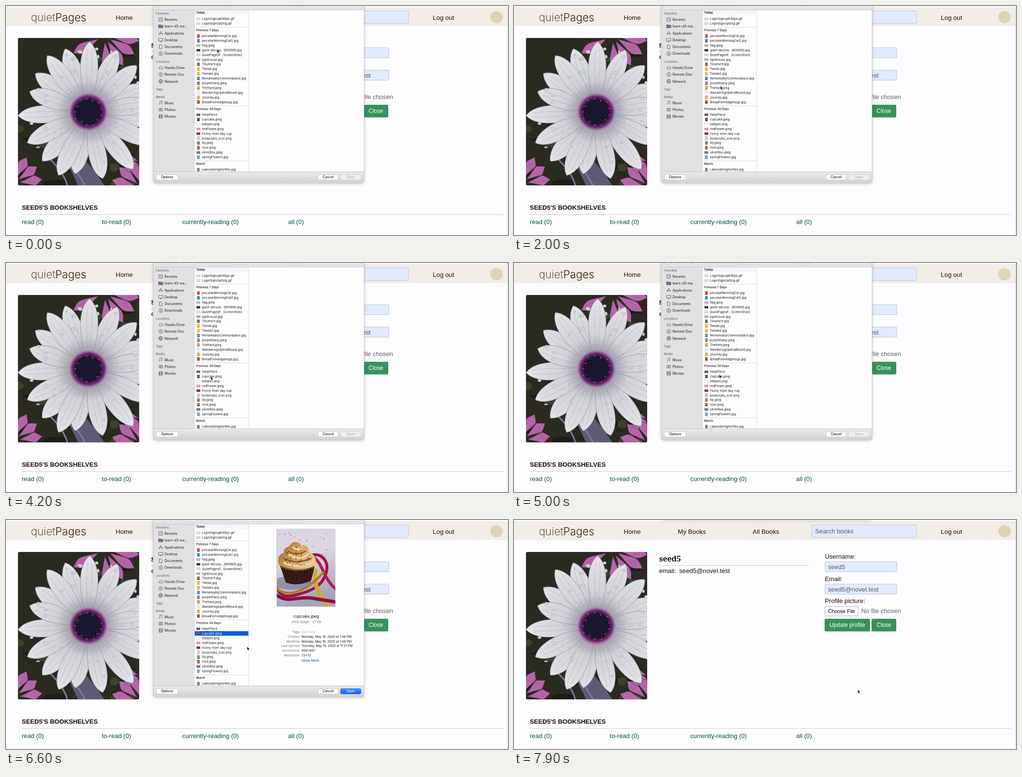
Animation of 1048 by 480 pixels, one loop 8 s. Source, as an HTML page:

```html
<!DOCTYPE html>
<html lang="en">
<head>
<meta charset="utf-8">
<title>Profile picture upload</title>
<style>
html, body { margin: 0; width: 100%; height: 100%; overflow: hidden; background: #fdfcfe; }
svg { display: block; width: 1048px; height: 480px; }
text { font-family: "Liberation Sans", Arial, sans-serif; white-space: pre; }
.ui text { font-family: Inter, Roboto, sans-serif; }
</style>
</head>
<body>
<svg id="stage" viewBox="0 0 1048 480"></svg>
<script>
const text = (x, y, s, size, fill = '#1c0d07', more = '') =>
  `<text x="${x}" y="${y}" font-size="${size}" fill="${fill}" ${more}>${s}</text>`;
const rect = (x, y, w, h, fill, more = '') =>
  `<rect x="${x}" y="${y}" width="${w}" height="${h}" fill="${fill}" ${more}/>`;
const path = (d, fill, more = '') => `<path d="${d}" fill="${fill}" ${more}/>`;
const ellipse = (x, y, rx, ry, fill, more = '') =>
  `<ellipse cx="${x}" cy="${y}" rx="${rx}" ry="${ry}" fill="${fill}" ${more}/>`;
const repeat = (n, f) => Array.from({ length: n }, (_, i) => f(i)).join('');
const middle = 'text-anchor="middle"', bold = 'font-weight="600"', medium = 'font-weight="500"';
const ink = '#161518', gray = '#6d6b70';

let seed = 7;
const random = () => (seed = seed * 16807 % 2147483647) / 2147483647;

const defs = `<defs>
  <radialGradient id="petal" gradientUnits="userSpaceOnUse" cx="0" cy="0" r="150">
    <stop offset=".2" stop-color="#8a3f8c"/><stop offset=".27" stop-color="#a9a3b2"/>
    <stop offset=".45" stop-color="#cfd1d6"/><stop offset="1" stop-color="#e4e5e9"/>
  </radialGradient>
  <radialGradient id="heart">
    <stop offset=".65" stop-color="#2c1436"/><stop offset=".85" stop-color="#6f2470"/>
    <stop offset="1" stop-color="#8b4a90" stop-opacity="0"/>
  </radialGradient>
  <linearGradient id="bar" x2="0" y2="1"><stop stop-color="#e9e8ea"/><stop offset="1" stop-color="#d2d1d3"/></linearGradient>
  <linearGradient id="blue" x2="0" y2="1"><stop stop-color="#3f93fa"/><stop offset="1" stop-color="#0a60ea"/></linearGradient>
  <linearGradient id="table" x2=".25" y2="1">
    <stop stop-color="#dcd5e3"/><stop offset=".45" stop-color="#d9d6e2"/><stop offset="1" stop-color="#a3a5b8"/>
  </linearGradient>
  <linearGradient id="cream" x2="1" y2=".5">
    <stop stop-color="#8a5a26"/><stop offset=".4" stop-color="#c4934a"/><stop offset="1" stop-color="#e3c78c"/>
  </linearGradient>
  <clipPath id="photo"><rect x="25" y="67" width="253" height="309" rx="3"/></clipPath>
  <clipPath id="shot"><rect x="565" y="18.5" width="122.5" height="163"/></clipPath>
  <clipPath id="list"><rect x="394" y="9" width="112" height="338"/></clipPath>
  <filter id="shadow" x="-10%" y="-10%" width="120%" height="120%"><feGaussianBlur stdDeviation="4"/></filter>
</defs>`;

function petal(angle, length, fill = 'url(#petal)', edge = '#8f919e', width = 1) {
  const l = length;
  return `<g transform="rotate(${angle}) scale(1 ${width})">` +
    path(`M15 0C55-21 ${l - 22}-28 ${l} 0C${l - 22} 28 55 21 15 0Z`, fill, `stroke="${edge}" stroke-width=".8"`) +
    path(`M45-3Q${l * .7}-8 ${l - 14}-3M45 3Q${l * .7} 8 ${l - 14} 4`, 'none', `stroke="${edge}" stroke-width=".8" opacity=".45"`) + '</g>';
}

function daisy() {
  const petals = [[-65, 143], [-24, 134], [8, 138], [52, 152], [102, 133], [133, 141], [177, 147], [216, 137], [250, 141],
    [-89, 147], [-44, 140], [-8, 132], [27, 146], [78, 143], [115, 147], [153, 143], [199, 130], [234, 146]];
  const pink = (x, y, angles, l) => `<g transform="translate(${x} ${y})">` +
    angles.map(a => petal(a, l, '#b565a6', '#6f3c6c', .55)).join('') + '</g>';
  return `<g clip-path="url(#photo)">` + rect(25, 67, 253, 309, '#2a2a21') +
    repeat(40, () => ellipse(25 + random() * 253, 67 + random() * 309, 8 + random() * 18, 3 + random() * 7,
      random() < .5 ? '#3c422c' : '#1c1d19')) +
    pink(205, 62, [8, 32, 58, 84, 150], 74) + pink(14, 372, [-62, -35, -8], 62) +
    pink(285, 382, [-165, -138, -112], 66) + pink(290, 330, [165, 200], 46) +
    path('M88 285Q125 315 150 376H205Q170 318 105 270Z', '#5d5a74') +
    path('M95 290Q140 330 165 376M80 310Q120 345 128 376', 'none', 'stroke="#827aa3" stroke-width="3"') +
    `<g transform="translate(172 222)">` + petals.map(p => petal(...p)).join('') +
    repeat(60, () => {
      const a = random() * 6.283, d = 58 + random() * 78;
      return ellipse(Math.cos(a) * d, Math.sin(a) * d, 1.2 + random() * 3.2, 1.2 + random() * 2.8,
        '#d3d5da', 'stroke="#9fa2ac" stroke-width=".7"');
    }) +
    ellipse(0, 0, 39, 38, 'url(#heart)') + ellipse(0, 0, 28, 27, '#17142c') +
    repeat(90, i => {
      const d = 2.9 * Math.sqrt(i), a = i * 2.4;
      return ellipse(Math.cos(a) * d, Math.sin(a) * d, 1.1, 1.1, '#292b4c');
    }) +
    repeat(26, i => {
      const a = i * .2417, d = 25 + i % 3 * 2.5;
      return ellipse(Math.cos(a) * d, Math.sin(a) * d, 1.4, 1.4, i % 2 ? '#a8603a' : '#2c142c');
    }) + '</g></g>';
}

function cupcake() {
  const line = (d, color, w) => path(d, 'none', `stroke="${color}" stroke-width="${w}" stroke-linecap="round"`);
  return `<g id="preview" clip-path="url(#shot)">` + rect(565, 18.5, 122.5, 163, 'url(#table)') +
    ellipse(596, 132, 42, 14, '#77768c', 'opacity=".6"') +
    repeat(26, () => ellipse(567 + random() * 118, 20 + random() * 62, 1.1, 1, random() < .5 ? '#c9347c' : '#a98ad0')) +
    line('M638 74C658 68 676 86 668 112S640 148 606 157 572 150 560 138', '#a30f48', 6) +
    line('M645 80C662 94 664 126 690 146', '#b01c50', 6) +
    line('M646 106C640 128 652 160 676 186', '#d3a637', 9) +
    line('M562 142C590 166 630 148 662 110', '#b07c22', 5) +
    line('M566 158C590 176 610 158 640 164T690 172', '#8e0d3f', 7) +
    path('M571 92L584 131Q610 140 637 127L645 93Z', '#2b1413') +
    repeat(11, i => line(`M${576 + i * 6.4} 99L${587 + i * 4.6} 132`, '#5c3228', 1)) +
    path('M570 94C565 78 572 71 580 69C579 60 586 56 592 56C594 44 611 43 616 53C629 53 634 60 632 67C643 70 650 82 646 95C632 110 584 110 570 94Z', 'url(#cream)') +
    line('M582 90Q612 104 641 88M592 74Q612 86 631 72M600 58Q609 66 618 57', '#ecd3a0', 5) +
    line('M573 97Q608 112 643 98M579 80Q606 95 637 80M590 66Q606 76 626 65', '#80521f', 2.5) +
    repeat(34, () => ellipse(582 + random() * 54, 56 + random() * 40, 1.2, 1.1, random() < .6 ? '#a51c3d' : '#6c2036')) +
    rect(565.25, 18.75, 122, 162.5, 'none', 'stroke="#8f8d96" stroke-width=".5"') + '</g>';
}

function page() {
  const nav = [[229, 'Home'], [342, 'My Books'], [498, 'All Books'], [891, 'Log out']];
  const shelves = [[33, 'read (0)'], [200, 'to-read (0)'], [368, 'currently-reading (0)'], [589, 'all (0)']];
  const field = (x, y, w, h, s) => rect(x + .3, y + .3, w - .8, h - .8, '#e2ebfd', 'rx="2" stroke="#c0c6d0"') +
    text(x + 6.5, y + h / 2 + 4.6, s, 13.2, '#565960');
  const green = (x, w, s) => rect(x, 207, w, 26.5, '#37915d', 'rx="2.5"') + text(x + w / 2, 224.2, s, 11.9, '#fff', middle);
  const rule = (x, y, w) => rect(x, y, w, 1, '#c9c7c9');
  return rect(0, 0, 1048, 480, '#fdfcfe') + rect(0, 3, 1048, 1, '#e6e3e3') + rect(0, 4, 1048, 38, '#f2ede6') +
    `<g class="ui">` + text(52, 32, '<tspan font-weight="200">quiet</tspan><tspan font-weight="300">Pages</tspan>', 22.6, '#382110') + '</g>' +
    nav.map(([x, s]) => text(x, 28.5, s, 13.4)).join('') +
    field(622, 10, 219, 27, 'Search books') + ellipse(1024, 23.5, 13, 13, '#dfd3b8') +
    daisy() +
    text(303, 87, 'seed5', 16, '#1c0d07', 'font-weight="700" style="font-family:\'Noto Serif\',serif"') + rule(303, 95, 313) +
    text(303, 111, 'email:', 13.2) + text(345, 111, 'seed5@novel.test', 13.2) +
    text(649, 81, 'Username:', 13.2) + field(649, 87, 151, 22, 'seed5') +
    text(649, 128, 'Email:', 13.2) + field(649, 134, 151, 22, 'seed5@novel.test') +
    text(649, 174.3, 'Profile picture:', 13.2) +
    rect(649, 181, 69, 20, '#fefefe', 'rx="2" stroke="#b0b0b0"') + text(684, 195, 'Choose File', 10.6, '#000', middle) +
    text(725, 195, 'No file chosen', 13.1, '#5e5e5e') +
    green(648.5, 94.5, 'Update profile') + green(746.5, 51.5, 'Close') +
    text(33, 427, 'SEED5\'S BOOKSHELVES', 13.15, '#1c0d07', 'font-weight="700"') + rule(33, 436.5, 1005) +
    shelves.map(([x, s]) => text(x, 457, s, 13.1, '#00503f')).join('') + rect(1047, 0, 1, 480, '#d6d4d6');
}

function sidebar() {
  const heads = [[16, 'Favorites'], [117, 'Locations'], [175, 'Tags'], [190.5, 'Media']];
  const folder = 'M0 1.5h4l1 1h5v6H0z', ring = 'M.5 5a4.5 4.5 0 1 0 9 0a4.5 4.5 0 1 0-9 0';
  const lens = 'M3.5 5a1.5 1.5 0 1 0 3 0a1.5 1.5 0 1 0-3 0';
  const items = [[28.3, 'Recents', 'M1 1h8v8H1zM5 3v2.5h2'], [42.6, 'learn-d3-ma...', folder],
    [57, 'Applications', 'M1 9L5 1L9 9M0 6h10'], [71.2, 'Desktop', 'M0 1.5h10v6H0zM3 9h4'],
    [85.5, 'Documents', 'M2 .5h4l2 2v7H2z'], [99.7, 'Downloads', ring + 'M5 2v5M3 5l2 2l2-2'],
    [129.2, 'Hazelo Drive', 'M2.5 8a2 2 0 0 1 0-4a3 3 0 0 1 5.5 0a2 2 0 0 1 0 4z'], [143.6, 'Remote Disc', ring + lens],
    [158, 'Network', ring + 'M.5 5h9M5 .5q-4 4.5 0 9q4-4.5 0-9'], [203, 'Music', 'M3 8V1.5l5-1V7M1 8h2M6 7h2'],
    [217.2, 'Photos', 'M1 2h8v6H1z' + lens], [231.5, 'Movies', 'M1 1h8v8H1zM3 1v8M7 1v8M1 5h8']];
  return heads.map(([y, s]) => text(313, y + 2.3, s, 6.2, gray, medium)).join('') +
    items.map(([y, s, d]) => `<g transform="translate(318.5 ${y - 4.5}) scale(.9)">` +
      path(d, d === folder ? '#77757a' : 'none', 'stroke="#59575c"') + '</g>' +
      text(331, y + 2.5, s, 7, ink)).join('');
}

// Each entry: name, thumbnail colour, and 1 for a wide thumbnail.
const groups = [
  ['Today', 14, 27, [['LoginSignup640px.gif', '#d5d5da', 1], ['LoginSignUpOrig.gif', '#d5d5da', 1]]],
  ['Previous 7 Days', 51, 63, [['peculiarMorningCat.jpg', '#cf2929'], ['peculiarMorningCat2.jpg', '#2c6fc4'],
    ['flag.jpeg', '#b9a9ad', 1], ['giant-decora...3810900.jpg', '#17171b', 1], ['QuietPagesF...ScreenShot2', '#d9d9d6', 1],
    ['lighthouse.jpg', '#86a9cc', 1], ['Toluma\'e.jpg', '#6c5148'], ['Tweak.jpg', '#e6b422'], ['Tweak2.jpg', '#e6b422'],
    ['RemarkablyCommonplace.jpg', '#4379ad'], ['purpleDaisy.jpeg', '#77717f'], ['TheYard.jpeg', '#d0913b'],
    ['WanderingUpAndRound.jpg', '#ececec'], ['Journey.jpg', '#c3ad43'], ['BreadForHedgehogs.jpg', '#8d3a2b']]],
  ['Previous 30 Days', 216, 228, [['HarpPiece', '#4b4a5c', 1], ['cupcake.jpeg', '#6b2a31'], ['editpen.png', '#f6f6f6', 1],
    ['redFlower.jpeg', '#e07fae', 1], ['Funny mom day cup', '#4d1c22', 1], ['bookclubs_icon.png', '#d3bfa0'],
    ['lily.jpeg', '#5b7a5c'], ['rose.jpeg', '#9c4848'], ['silverBox.jpeg', '#5e6176', 1], ['springFlowers.jpg', '#6d8fb0']]],
  ['March', 331, 343, [['LakesideHigherRes.jpg', '#68756e']]]
];

function files() {
  const row = ([name, color, wide], y) => {
    const w = wide ? 7.5 : 5.2, h = wide ? 4.8 : 7;
    return rect(401.6 - w / 2, y - h / 2, w, h, color, 'stroke="#b4b2b6" stroke-width=".4"') +
      rect(401.6 - w / 4, y - h / 5, w / 2, h / 4, '#fff', 'opacity=".45"') +
      text(409, y + 2.2, name, 6.5, ink, name === 'cupcake.jpeg' ? 'id="chosen"' : '');
  };
  return `<g clip-path="url(#list)">` + rect(394, 9, 112, 10.5, '#f5f4f6') +
    rect(394, 233, 112, 9.5, '#0d5bdc', 'class="picked"') +
    groups.map(([title, y, top, list], i) =>
      (i ? rect(394, y - 7, 112, .8, '#d4d2d5') : '') +
      text(397, y + 2.3, title, 6.2, ink, i ? medium : bold) +
      list.map((f, k) => row(f, top + k * 9.88)).join('')).join('') + '</g>';
}

function details() {
  const rows = [['Tags', 'Add Tags...'], ['Created', 'Monday, May 18, 2020 at 1:48 PM'], ['Modified', 'Monday, May 18, 2020 at 1:48 PM'],
    ['Last opened', 'Tuesday, May 19, 2020 at 11:31 PM'], ['Dimensions', '500×667'], ['Resolution', '72×72']];
  return `<g class="picked">` + text(626.5, 205, 'cupcake.jpeg', 8.4, ink, middle) +
    text(626.5, 216.2, 'JPEG image - 37 KB', 6.6, gray, middle) +
    rows.map(([a, b], i) => text(612.5, 236.7 + i * 9.9, a, 6.5, gray, 'text-anchor="end"') +
      text(617, 236.7 + i * 9.9, b, 6.55, i ? ink : '#bbb9bd')).join('') +
    text(617, 297, 'Show More', 6.8, '#0b63dc', medium) + '</g>';
}

function dialog() {
  const button = (x, w, s, fill = '#fefefe', color = '#111', edge = '#bdbbbe', more = '') =>
    `<g ${more}>` + rect(x, 353.5, w, 11, fill, `rx="2.5" stroke="${edge}" stroke-width=".7"`) +
    text(x + w / 2, 361.4, s, 6.9, color, `${middle} ${medium}`) + '</g>';
  const tools = [[315, 12], [329, 12], [346, 11], [358, 12], [374, 24], [471, 114], [621, 118]];
  return `<g id="dialog" class="ui">` + rect(309, -6, 437, 377, '#000', 'rx="5" opacity=".3" filter="url(#shadow)"') +
    rect(307.5, -10, 440, 381, '#e1e0e3', 'rx="4" stroke="#b9b7bb" stroke-width=".6"') +
    rect(308, 0, 439, 8, '#e4e3e5') + tools.map(([x, w]) => rect(x, -6, w, 8, '#fafafa', 'rx="2" stroke="#c4c2c6" stroke-width=".6"')).join('') +
    rect(308, 8, 439, .8, '#bfbdc1') + rect(393.5, 8.8, 353.5, 338.5, '#fefdfe') + rect(393, 8.8, .7, 338.5, '#cfcdd0') +
    rect(506, 8.8, .8, 338.5, '#d9d7da') +
    path('M308 347.5H747V367Q747 371 743 371H312Q308 371 308 367Z', 'url(#bar)') + rect(308, 347, 439, .8, '#bfbdc1') +
    sidebar() + files() + details() + cupcake() + button(314, 45, 'Options') + button(651.5, 42, 'Cancel') +
    button(698.5, 42.5, 'Open', '#efeef0', '#b0aeb2', '#cfcdd0') +
    button(698.5, 42.5, 'Open', 'url(#blue)', '#fff', '#1c62cf', 'class="picked"') + '</g>';
}

const stage = document.getElementById('stage');
stage.innerHTML = defs + page() + dialog() +
  path('M0 0V7.8L1.8 6.2L3 8.9L4.3 8.3L3.1 5.7H5.5Z', '#0a0a0a', 'id="cursor" stroke="#fff" stroke-width=".6"');

const get = id => document.getElementById(id);
const sheet = get('dialog'), cursor = get('cursor'), chosen = get('chosen'), preview = get('preview');
const picked = stage.querySelectorAll('.picked');
const show = (el, on) => el.setAttribute('visibility', on ? 'visible' : 'hidden');
const ease = p => (p = Math.min(1, Math.max(0, p)), p * p * (3 - 2 * p));
// time, x, y of the pointer tip
const track = [[0, 441, 90.5], [2000, 431, 167.5], [3300, 423.5, 251.5], [4600, 428.5, 233.5],
  [6300, 428.5, 233.5], [7200, 717, 355], [8000, 717.5, 355.5]];

function draw(now) {
  const t = Math.floor(now % 8000 / 100) * 100;
  const i = track.findIndex(k => k[0] > t), [a, x, y] = track[i - 1], [b, u, v] = track[i];
  const p = ease((t - a) / (b - a));
  cursor.setAttribute('transform', `translate(${x + (u - x) * p} ${y + (v - y) * p})`);
  const on = t >= 5500;
  picked.forEach(el => show(el, on));
  chosen.setAttribute('fill', on ? '#fff' : ink);
  show(preview, t >= 6300);
  sheet.setAttribute('transform', `translate(0 ${-372 * ease((t - 7500) / 400)})`);
}

const start = performance.now();
function tick() {
  draw(performance.now() - start);
  requestAnimationFrame(tick);
}
tick();
</script>
</body>
</html>
```
